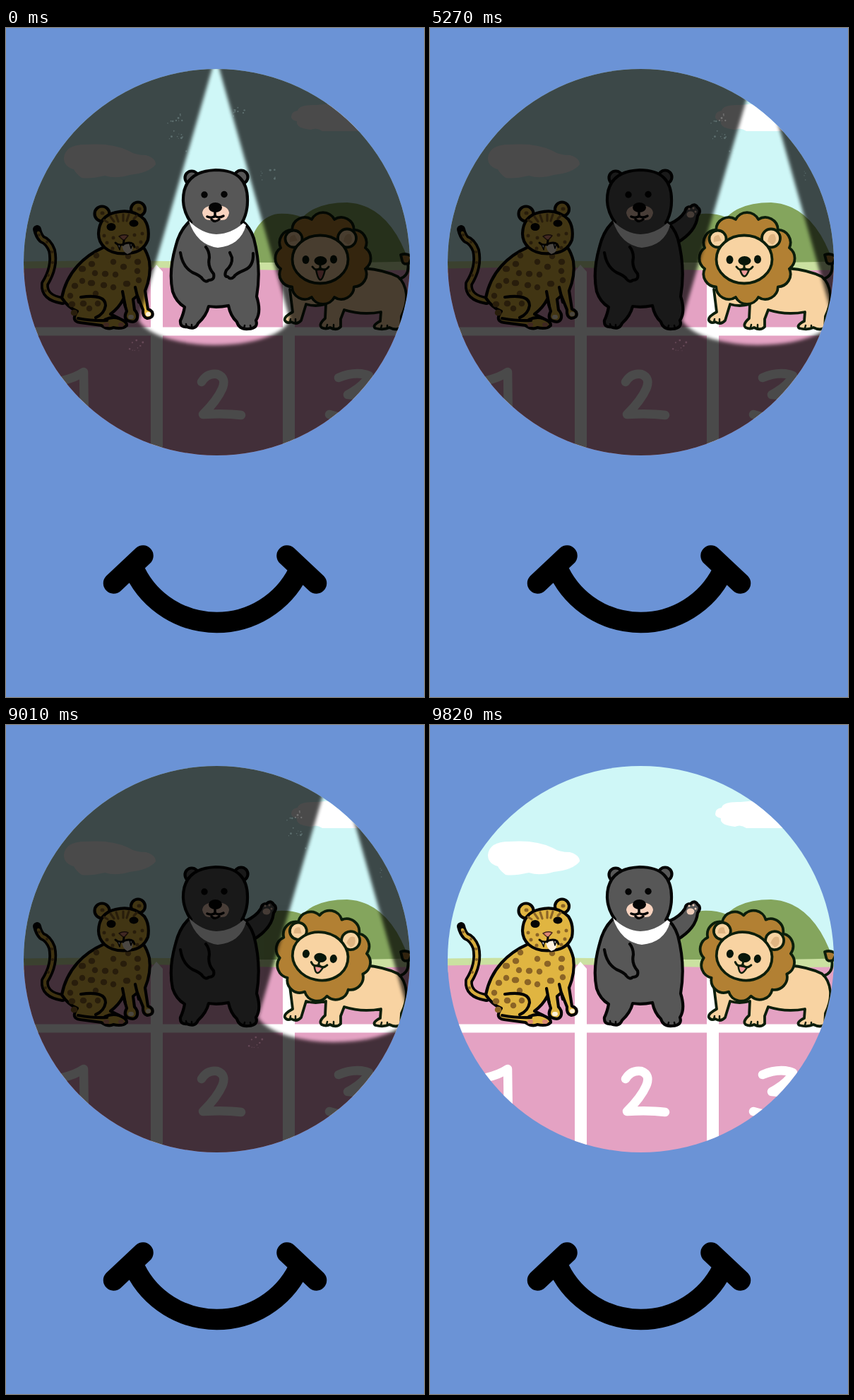
An HTML page for the animation above (9.99 s loop, 592 px wide and 947 px high).

```html
<!DOCTYPE html>
<html lang="en">
<head>
<meta charset="utf-8">
<title>Spotlight on three animals</title>
<style>
  html, body { margin: 0; height: 100%; overflow: hidden; background: #6b93d6; }
  svg { display: block; width: 100vw; height: 100vh; }
  path, ellipse, circle { stroke-linecap: round; stroke-linejoin: round; }
  .ink { stroke: #050505; stroke-width: 4.2; }
  .none { fill: none; }
  .fur { fill: #575757; }
  .cat { fill: #e0b541; }
  .lion { fill: #f8d3a2; }
  .green .ink { stroke: #0c1e0b; stroke-width: 3.8; }
  .spots { fill: none; stroke: #8b6426; stroke-width: 8.5; }
  .solid { fill: #050505; }
</style>
</head>
<body>
<svg viewBox="0 0 592 947">
  <defs>
    <clipPath id="port"><circle cx="298.5" cy="331.5" r="273.5"/></clipPath>
    <filter id="soft" x="-20%" y="-20%" width="140%" height="140%"><feGaussianBlur stdDeviation="2.6"/></filter>
    <mask id="shade" maskUnits="userSpaceOnUse" x="0" y="0" width="592" height="947">
      <path fill="#fff" d="M0 0H592V947H0Z"/>
      <g id="beam">
        <path filter="url(#soft)" d="M293 54H301L402 412Q398 425 378 434Q345 449 295 449Q262 449 230 440Q198 430 188 414Z"/>
        <g id="specks" opacity=".22"></g>
      </g>
    </mask>
  </defs>

  <g clip-path="url(#port)">
    <path fill="#cff7f7" d="M0 0H592V340H0Z"/>
    <g fill="#fff">
      <path d="M82 184Q84 165 112 165Q150 162 174 174Q183 180 198 180Q212 184 212 193Q203 205 175 208Q155 214 140 209Q118 214 107 212Q99 206 96 200Q82 196 82 184Z"/>
      <path d="M404 126Q404 118 413 117Q415 108 440 109Q470 105 495 110L525 146H448Q440 140 432 144Q410 142 412 132Q404 130 404 126Z"/>
    </g>
    <path fill="#84a55d" d="M340 332Q348 268 385 263Q405 262 420 268Q440 247 483 247Q543 250 571 332Z"/>
    <path fill="#cbe1a1" d="M0 331Q150 328 300 331T592 330V350H0Z"/>
    <path fill="#e4a2c3" d="M0 341Q150 337 300 341T592 342V620H0Z"/>
    <path fill="#fff" d="M0 423.500H592V435.500H0ZM205 345L213 335L222 345V620H205ZM392 345H409V620H392Z"/>
    <path class="none" stroke="#fff" stroke-width="12.500" d="M80 499Q98 495 110 487L111 560M277 501Q285 488 299 490Q313 495 306 511Q299 527 279 547Q310 545 333 548M471 495Q495 485 514 492Q508 506 484 519Q515 520 520 540Q500 560 458 547"/>

    <!-- leopard -->
    <g>
      <g id="catTail" class="none">
        <path stroke="#050505" stroke-width="12" d="M80 386Q53 382 55 362Q70 338 65 315Q60 302 51 299Q46 294 44 285"/>
        <path stroke="#d6ac3d" stroke-width="4.500" d="M82 386Q53 382 55 362Q70 338 65 315Q60 302 51 299Q48 296 46 290"/>
        <path class="spots" style="stroke-width:4" d="M56 372h0M60 350h0M66 332h0M65 317h0M58 303h0M47 293h0"/>
      </g>
      <path class="cat ink" d="M137 311C112 322 86 345 79 382Q88 396 101 401Q91 415 105 417L135 421Q145 428 152 424Q165 427 171 421Q172 416 160 411L148 405Q160 396 166 384L171 401Q166 410 172 414Q184 419 186 410Q187 404 182 399L180 384L186 379L194 399Q193 409 200 411Q210 410 207 402Q205 399 201 398L197 372Q206 350 203 330Q200 318 195 311"/>
      <path class="spots" d="M107 341h2M121 334h1M128 322h0M140 348h1M152 331h0M166 338h1M173 323h0M186 331h1M188 357h0M170 362h2M152 367h0M138 364h1M120 361h2M108 358h0M97 365h1M127 376h0M91 379h0M93 391h1M109 390h1M96 403h1M118 397h0M130 390h0M186 344h0M155 349h0M126 347h0"/>
      <path class="none ink" d="M106 381Q141 376 141 393Q139 405 127 410M102 411Q125 415 143 414M140 413Q150 408 160 411M165 373L169 394M183 367L188 388"/>
      <path fill="none" stroke="#fff1d8" stroke-width="6" d="M176 409l2 0M201 405h1"/>
      <path fill="none" stroke="#d98973" stroke-width="6" d="M141 420h2M162 420h2"/>
      <g class="cat ink"><circle cx="136" cy="263" r="10.500"/><circle cx="187" cy="256.500" r="10"/></g>
      <path class="cat ink" d="M131 291Q132 266 155 261Q180 255 196 271Q204 283 201 300Q195 315 180 318Q154 323 140 311Q131 303 131 291Z"/>
      <path class="spots" style="stroke-width:3.200" d="M148 267l5 7M156 265l3 9M166 264v9M174 264l-3 9M139 272l5 3M185 266l-4 4"/>
      <path class="spots" style="stroke-width:5" d="M139 294h0M143 304h0M151 312h0M152 297h0M193 291h0M191 303h0M186 311h0M136 262h1M188 256h1M182 293h0"/>
      <g class="solid"><ellipse cx="149" cy="281.500" rx="6.500" ry="5.500"/><ellipse cx="181" cy="276.500" rx="6.500" ry="5"/></g>
      <path fill="#df8975" stroke="#4b2a20" stroke-width="1.500" d="M160 295Q167 291 173 294L167 301Z"/>
      <path id="catJaw" fill="#fff2df" d="M164 306Q173 302 179 307Q181 318 172 320Q165 317 164 306Z"/>
      <path class="none ink" style="stroke-width:3" d="M167 301L166 307M155 304Q160 309 166 306Q175 302 180 306L182 310"/>
      <path fill="#fff" stroke="#050505" stroke-width="1.500" d="M158 307l4 0l-1 7ZM175 305l4 1l-2 6Z"/>
    </g>

    <!-- bear -->
    <g>
      <g id="armUpright">
        <path class="fur ink" d="M340 278Q352 266 356 252Q360 247 365 248Q372 243 376 250Q378 260 373 282Q366 296 350 304"/>
        <ellipse cx="365" cy="258" rx="5" ry="4.500" fill="#efcdb9"/>
        <path class="none" stroke="#efcdb9" stroke-width="3" d="M360 251h0M366 250h0M371 253h0"/>
      </g>
      <g id="armOut">
        <path class="fur ink" d="M340 277Q354 271 361 260Q362 253 369 253Q375 247 379 254Q385 258 379 266Q377 288 350 304"/>
        <ellipse cx="369" cy="264" rx="5.500" ry="4.500" fill="#efcdb9"/>
        <path class="none" stroke="#efcdb9" stroke-width="3" d="M367 256h0M373 255h0M376 260h0"/>
      </g>
      <path class="fur ink" d="M262 272Q246 285 240 310Q230 345 236 373Q241 388 253 395Q251 406 247 414Q246 424 256 423Q268 428 272 418Q284 407 287 394Q300 396 315 393Q318 408 327 416Q330 427 343 426Q358 425 354 414Q362 402 355 380Q362 340 351 298Q346 282 333 272"/>
      <path class="none ink" style="stroke-width:2.500" d="M255 419l1 4M263 420l0 4M338 421l-1 4M346 421l1 4"/>
      <path class="none ink" d="M247 318Q250 338 264 346Q276 351 278 355Q283 361 287 357Q296 357 294 348Q285 338 288 325Q288 316 283 310"/>
      <path id="armDown" class="none ink" transform="translate(601 0) scale(-1 1)" d="M251 319Q250 338 264 343Q276 348 278 352Q283 357 287 352Q293 352 289 343Q280 335 281 325L284 318"/>
      <g id="bearHead">
        <g class="fur ink"><circle cx="263" cy="212" r="9.500"/><circle cx="333" cy="211" r="9.500"/></g>
        <path class="fur" d="M251 245Q250 203 297 201Q343 201 342 245Q342 262 334 276Q298 305 262 275Q252 262 251 245Z"/>
        <path class="none ink" d="M262 275Q252 262 251 245Q250 203 297 201Q343 201 342 245Q342 262 334 276"/>
        <path fill="#fff" d="M259 273Q277 291 298 292Q320 291 336 276L340 279Q332 308 300 311Q270 307 259 273Z"/>
        <path fill="#f8d3bf" d="M278 262Q279 251 297 251Q315 251 316 262Q314 273 304 272Q297 277 289 272Q280 272 278 262Z"/>
        <g class="solid"><circle cx="281" cy="236" r="4.700"/><circle cx="309" cy="235.500" r="4.700"/><ellipse cx="296.500" cy="254" rx="9.500" ry="7"/></g>
        <path class="none ink" style="stroke-width:3.500" d="M296 259V267M285 267Q292 270 296 266Q301 270 308 266M291 271Q296 276 302 271"/>
      </g>
    </g>

    <!-- lion -->
    <g class="green">
      <path class="lion ink" d="M402 370L406 402Q393 409 395 414Q398 419 404 416Q412 421 418 414L425 391Q438 395 453 391L452 411Q442 420 447 424Q453 427 459 424Q468 429 474 423L474 412L479 399Q505 407 531 402L530 415Q518 421 523 425Q535 428 543 424Q553 429 559 424L560 408Q568 392 567 377Q565 360 555 352Q535 342 505 340"/>
      <path class="none ink" style="stroke-width:2.500" d="M403 412l-1 4M410 412l0 5M455 420l-1 4M464 420l0 5M532 421l-1 4M540 421l0 4"/>
      <g id="tailUp">
        <path class="none ink" d="M558 355Q572 350 569 333"/>
        <path class="ink" fill="#a87931" d="M559 321Q568 318 575 324L571 333Q562 336 561 329Z"/>
      </g>
      <g id="tailDown">
        <path class="none ink" d="M570 344Q562 363 541 371"/>
        <path class="ink" style="stroke-width:2.500" fill="#b28033" d="M543 370Q535 366 527 374Q532 377 529 382Q539 387 543 378Z"/>
      </g>
      <g id="lionHead">
        <path id="mane" class="ink" fill="#b28033"/>
        <g class="lion ink"><circle cx="407.500" cy="298.500" r="12"/><circle cx="483" cy="297.500" r="13"/></g>
        <path fill="#dfb582" d="M402 303Q400 293 409 293L413 301ZM478 302Q480 289 488 292Q493 302 485 307Z"/>
        <ellipse class="lion ink" cx="445" cy="327.500" rx="39.500" ry="34"/>
        <g fill="#07160a"><ellipse cx="424.500" cy="328" rx="5" ry="6"/><ellipse cx="464" cy="327.500" rx="5" ry="6"/><ellipse cx="445.500" cy="329.500" rx="9" ry="6.500"/></g>
        <path id="tongue" class="ink" style="stroke-width:2.500"/>
        <path class="none ink" style="stroke-width:3" d="M445 335V339M434 338Q439 345 445 340Q452 345 457 338"/>
      </g>
    </g>

    <path id="dark" mask="url(#shade)" d="M0 0H592V947H0Z"/>
  </g>

  <path class="none" stroke="#000" stroke-width="29.500" d="M183 770A129 129 0 0 0 414 770M152.500 786L194 747M398 747L439.500 786"/>
</svg>

<script>
const LOOP = 9990, SHADE = 0.71;
const el = id => document.getElementById(id);
const show = (id, visible) => el(id).setAttribute('visibility', visible ? 'visible' : 'hidden');
const turn = (id, angle, x, y) => el(id).setAttribute('transform', `rotate(${angle} ${x} ${y})`);
const passed = (t, times) => times.filter(time => t >= time).length;

const bearNods = [200, 400, 600, 800, 1000, 1200];
const waves = [1700, 1900, 2100, 2300, 2500, 2700];
const catBites = [3070, 3270, 3440, 3640];
const catWags = [4040, 4240, 4440, 4670, 4870, 5070];
const lionLaughs = [5270, 5470, 5670, 5840, 6040, 6200, 6700];
const lionNods = [7240, 7540, 7840, 8140, 8410, 8710, 9010];
const lionWags = [6700, 6970, ...lionNods.slice(1)];

// Scalloped mane: equal arcs around an ellipse
const bumps = 12;
const rim = i => {
  const a = (i + 0.5) * 2 * Math.PI / bumps;
  return `${449 + 62 * Math.cos(a)} ${326 + 57 * Math.sin(a)}`;
};
el('mane').setAttribute('d', 'M' + rim(0) +
  Array.from({ length: bumps }, (_, i) => `A18 18 0 0 1 ${rim(i + 1)}`).join('') + 'Z');

// Faint chalk dust beside the beam
let seed = 7;
const random = () => (seed = seed * 16807 % 2147483647) / 2147483647;
for (const [x, y] of [[240, 128], [265, 178], [328, 118], [372, 207], [185, 450], [240, 150]])
  for (let i = 0; i < 9; i++) {
    const dot = document.createElementNS('http://www.w3.org/2000/svg', 'circle');
    dot.setAttribute('cx', x + 22 * (random() - 0.5));
    dot.setAttribute('cy', y + 16 * (random() - 0.5));
    dot.setAttribute('r', 0.5 + random());
    el('specks').append(dot);
  }

function draw(t) {
  turn('bearHead', passed(t, bearNods) % 2 ? -15 : 0, 298, 290);

  const wave = passed(t, waves);
  show('armDown', !wave);
  show('armUpright', wave % 2);
  show('armOut', wave && wave % 2 === 0);

  show('catJaw', passed(t, catBites) % 2 === 0);
  turn('catTail', passed(t, catWags) % 2 ? -12 : 0, 80, 383);

  const smallMouth = passed(t, lionLaughs) % 2;
  el('tongue').setAttribute('d', `M439 342Q445 ${smallMouth ? 361 : 371} 452 342Z`);
  el('tongue').setAttribute('fill', smallMouth ? '#f09b9b' : '#c96f70');
  turn('lionHead', passed(t, lionNods) % 2 ? 11 : 0, 446, 328);
  const tailLowered = passed(t, lionWags) % 2;
  show('tailUp', !tailLowered);
  show('tailDown', tailLowered);

  el('beam').setAttribute('transform', `translate(${t < 2870 ? 0 : t < 5270 ? -151 : 169} 0)`);
  const fade = t < 9580 ? 0 : Math.min(9, Math.floor((t - 9580) / 30) + 1);
  el('dark').setAttribute('opacity', SHADE * (1 - fade / 9));
}

const start = performance.now();
function tick() {
  draw((performance.now() - start) % LOOP);
  requestAnimationFrame(tick);
}
tick();
</script>
</body>
</html>
```
